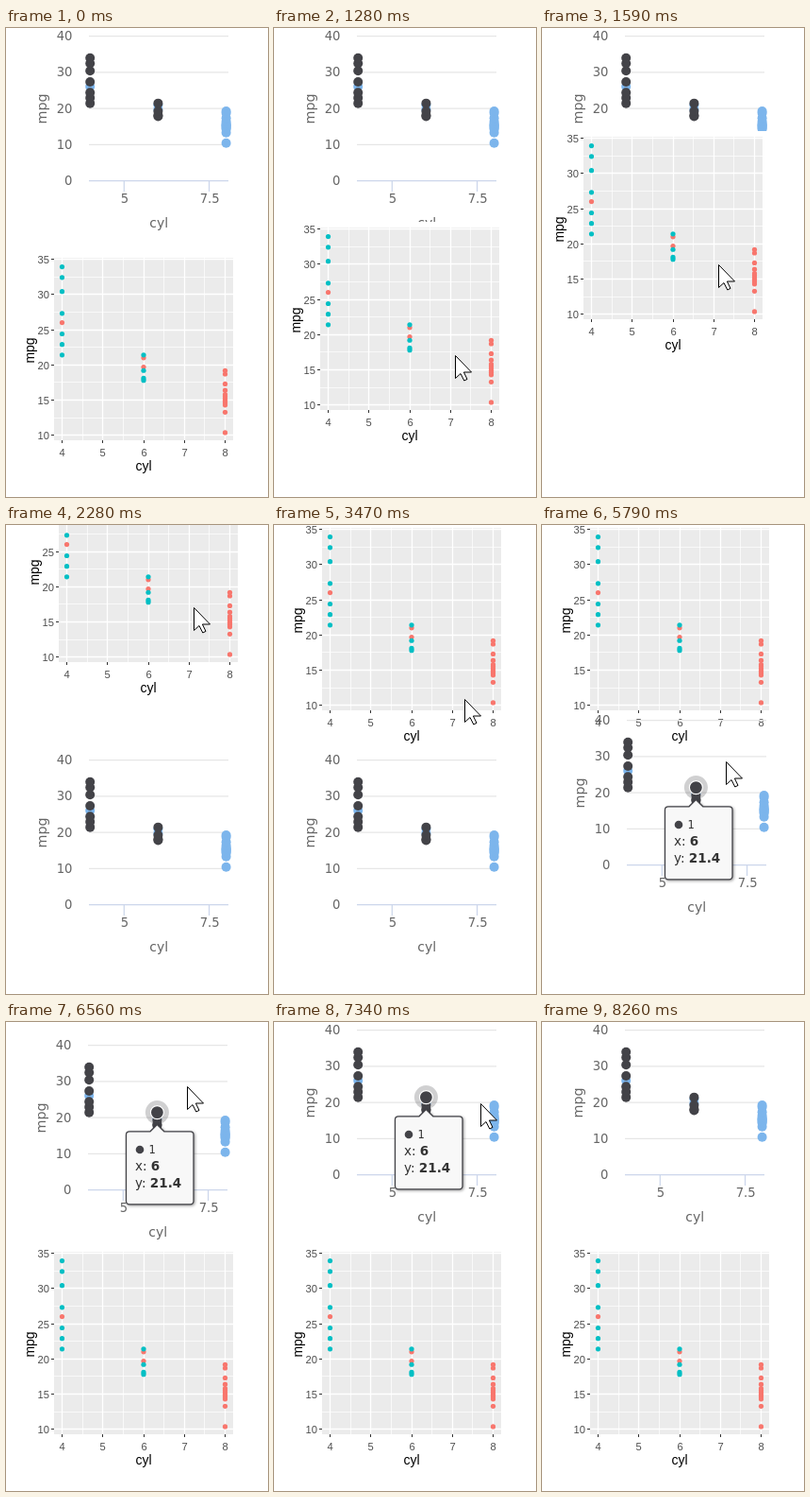
An HTML page for the animation above (8.88 s loop, 278 px wide and 496 px high).

```html
<!DOCTYPE html>
<html lang="en">
<head>
<meta charset="utf-8">
<title>Sortable charts</title>
<style>
  html, body { margin: 0; width: 100%; height: 100%; overflow: hidden; background: #fff; }
  svg { display: block; }
  .web { font-family: "DejaVu Sans", sans-serif; fill: #666; }
  .plot { font-family: "Liberation Sans", Arial, sans-serif; fill: #4d4d4d; }
  .tip { font-family: "DejaVu Sans", sans-serif; fill: #333; }
  .box { filter: drop-shadow(1px 1px 1.5px rgba(0, 0, 0, .4)); }
</style>
</head>
<body>
<svg id="stage" width="278" height="496" viewBox="0 0 278 496"></svg>
<script>
const LOOP = 8880;
const STEP = 75;   // ms between two pictures of a movement
const SLOT = 240;  // distance between the two places in the list
const stage = document.getElementById('stage');

function add(parent, tag, attrs, text) {
  const el = document.createElementNS('http://www.w3.org/2000/svg', tag);
  for (const key in attrs) el.setAttribute(key, attrs[key]);
  if (text !== undefined) el.textContent = text;
  return parent.appendChild(el);
}
const line = (g, x1, y1, x2, y2, stroke, width = 1) =>
  add(g, 'line', { x1, y1, x2, y2, stroke, 'stroke-width': width });
const dot = (g, cx, cy, r, fill, extra) => add(g, 'circle', { cx, cy, r, fill, ...extra });
const label = (g, x, y, size, text, anchor = 'start', extra) =>
  add(g, 'text', { x, y, 'font-size': size, 'text-anchor': anchor, ...extra }, text);
const sideLabel = (g, x, y, size, text, extra) =>
  label(g, 0, 0, size, text, 'middle', { transform: `translate(${x} ${y}) rotate(-90)`, ...extra });
const range = (from, to, by) =>
  Array.from({ length: Math.round((to - from) / by) + 1 }, (_, i) => from + i * by);
const snap = v => Math.floor(v) + .5;

// Two groups of cars: cylinders -> miles per gallon
const groups = [
  { 4: [26], 6: [21, 19.7], 8: [10.4, 13.3, ...range(14.3, 15.8, .3), 16.4, 17.3, 18.7, 19.2] },
  { 4: [...range(21.4, 24.4, 1.5), 27.3, 30.4, 32.4, 33.9], 6: [17.8, 18.1, 19.2, 21.4] }
];
function scatter(g, px, py, r, colors) {
  groups.forEach((group, i) => {
    for (const cyl in group)
      for (const mpg of group[cyl]) dot(g, px(+cyl), py(mpg), r, colors[i]);
  });
}

function webChart() {
  const g = add(stage, 'g', { class: 'web' });
  const px = c => 89.2 + (c - 4) * 36.1;
  const py = m => 161.5 - m * 3.825;
  for (const m of range(0, 40, 10)) {
    line(g, 88, py(m), 236, py(m), m ? '#e6e6e6' : '#ccd6eb', 1.25);
    label(g, 70.5, snap(py(m)) + 4, 13.2, m, 'end');
  }
  for (const c of [5, 7.5]) {
    line(g, px(c), py(0), px(c), 173, '#ccd6eb', 1.25);
    label(g, px(c) + .6, 185, 13.2, c, 'middle');
  }
  label(g, 162.3, 210.5, 14, 'cyl', 'middle');
  sideLabel(g, 43, 85.5, 14.3, 'mpg');
  scatter(g, px, py, 5, ['#7cb5ec', '#434348']);
  return g;
}

function tooltip(parent) {
  const g = add(parent, 'g', { class: 'tip' });
  const dark = '#434348';
  dot(g, 161.4, 79.6, 12.5, dark, { 'fill-opacity': .25 });
  dot(g, 161.4, 79.6, 7, dark, { stroke: '#fff', 'stroke-width': 1.2 });
  add(g, 'path', {
    class: 'box', fill: '#f8f8f8', stroke: dark, 'stroke-width': 1.3,
    d: 'M132 99.8h22l7.4-7.3 7.4 7.3h27.7q3.5 0 3.5 3.5v70q0 3.5-3.5 3.5H132q-3.5 0-3.5-3.5v-70q0-3.5 3.5-3.5z'
  });
  dot(g, 143, 119, 4.3, dark);
  label(g, 152.5, 123, 11.5, '1');
  ['x: 6', 'y: 21.4'].forEach((text, i) => {
    const row = label(g, 138, 141 + i * 17.5, 13.5, text.slice(0, 3), 'start', { 'xml:space': 'preserve' });
    add(row, 'tspan', { 'font-weight': 'bold' }, text.slice(3));
  });
  return g;
}

function plotChart() {
  const g = add(stage, 'g', { class: 'plot' });
  const left = 51, top = 243, right = 241, bottom = 436;
  const px = c => 59.5 + (c - 4) * 43.25;
  const py = m => 244.4 + (35 - m) * 7.46;
  add(g, 'rect', { x: 20, y: 237, width: 227, height: 239, fill: '#fff' });
  add(g, 'rect', { x: left, y: top, width: right - left, height: bottom - top, fill: '#ebebeb' });
  for (const m of range(10, 35, 2.5)) {
    const y = snap(py(m)), major = m % 5 === 0;
    line(g, left, y, right, y, '#fff', major ? 1.3 : .7);
    if (!major) continue;
    line(g, left - 3, y, left, y, '#333');
    label(g, 46, y + 4.5, 11.2, m, 'end');
  }
  for (const c of range(4, 8, .5)) {
    const x = snap(px(c)), major = c % 1 === 0;
    line(g, x, top, x, bottom, '#fff', major ? 1.3 : .7);
    if (!major) continue;
    line(g, x, bottom, x, bottom + 3, '#333');
    label(g, x, 453, 11.2, c, 'middle');
  }
  label(g, 146, 468, 14, 'cyl', 'middle', { fill: '#000' });
  sideLabel(g, 29.5, 341, 14, 'mpg', { fill: '#000' });
  scatter(g, px, py, 2.6, ['#f8766d', '#00bfc4']);
  return g;
}

const web = webChart();
const tip = tooltip(web);
const plot = plotChart();
const cursor = add(stage, 'path', {
  d: 'M.5.5V24.5L6 19.5L9.8 27L13 25.4L9.4 18H17.5z',
  fill: '#fff', stroke: '#000', 'stroke-linejoin': 'round'
});

// Pointer stops: time of departure, number of steps, place reached
const stops = [
  [520, 5, 194, 378],
  [1280, 5, 187, 250],
  [1670, 9, 199, 87],
  [2450, 6, 200, 151],
  [3230, 4, 202, 184],
  [3930, 7, 196, 95],
  [4710, 5, 167, 316],
  [5260, 3, 193, 292],
  [5640, 3, 195, 250],
  [5870, 10, 192, 68],
  [7040, 4, 194, 56],
  [7340, 3, 256, 130],
  [7570, 5, 178, 190],
  [7950, 5, 157, 500]
];
const ease = p => 1 - (1 - p) ** 1.3;

function pointer(t) {
  let x = 284, y = 440;
  for (const [start, steps, toX, toY] of stops) {
    if (t < start) break;
    const p = ease(Math.min(1, (Math.floor((t - start) / STEP) + 1) / steps));
    x += (toX - x) * p;
    y += (toY - y) * p;
  }
  return [Math.round(x), Math.round(y)];
}

// A grabbed chart follows the pointer; the grip is the held point in its first place
const drags = [
  { chart: plot, from: 1280, to: 3080, grip: [194, 378] },
  { chart: web, from: 5640, to: 7340, grip: [193, 52] }
];

const move = (el, x, y) => el.setAttribute('transform', `translate(${x} ${y})`);

function draw(t) {
  const [x, y] = pointer(t);
  const drag = drags.find(d => t >= d.from && t < d.to);
  const dx = drag ? x - drag.grip[0] : 0;
  const dy = drag ? y - drag.grip[1] : 0;

  // The charts trade places once one is dragged 60 % of the way
  let swapped = t >= drags[0].to && t < drags[1].from;
  if (drag) swapped = drag.chart === plot ? dy < -.6 * SLOT : dy > .4 * SLOT;

  move(web, 0, swapped ? SLOT : 0);
  move(plot, 0, swapped ? -SLOT : 0);
  if (drag) move(drag.chart, dx, dy);
  move(cursor, x, y);
  tip.style.display = t >= 4935 && t < 7570 ? '' : 'none';

  const upper = t < drags[0].to ? plot : web;
  if (cursor.previousSibling !== upper) stage.insertBefore(upper, cursor);
}

const begin = performance.now();
function frame() {
  draw(Math.max(0, performance.now() - begin) % LOOP);
  requestAnimationFrame(frame);
}
frame();
</script>
</body>
</html>
```
